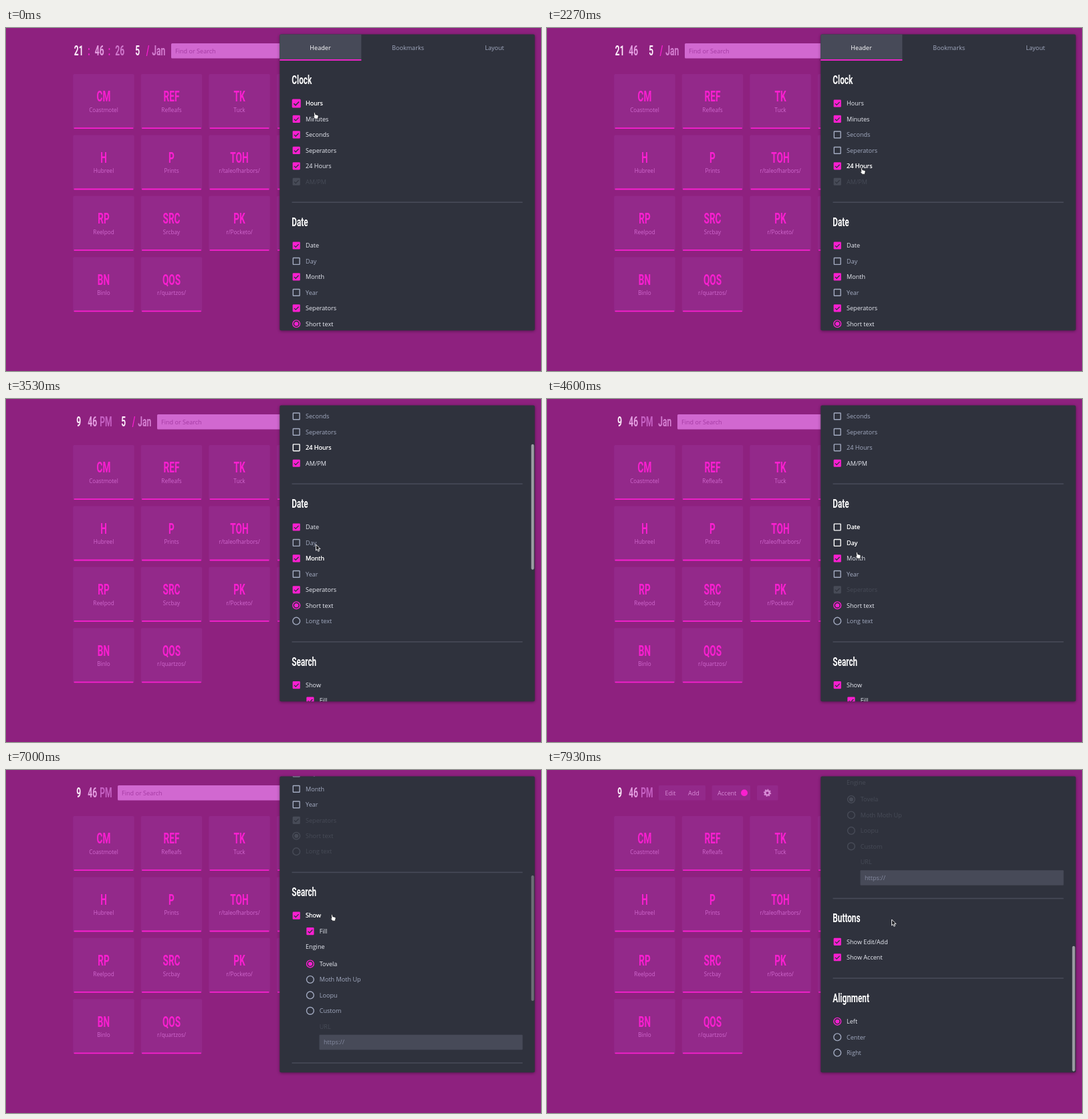
These frames come from a looping animation (800 px wide and 514 px high, 8000 ms). An HTML page:

```html
<!DOCTYPE html>
<html lang="en">
<head>
<meta charset="utf-8">
<title>Start page settings</title>
<style>
  html, body { margin: 0; width: 100%; height: 100%; overflow: hidden; background: #8e217f; }
  svg { display: block; width: 100%; height: 100%; }
  text { font: 9.1px "Open Sans", "Noto Sans", sans-serif; }
  .display { font-family: Roboto, "Liberation Sans", sans-serif; font-weight: 700; }
  .strong { text-shadow: 0 0 .6px #fff; }
  .panel { filter: drop-shadow(0 1px 2px #0006); }
</style>
</head>
<body>
<svg viewBox="0 0 800 514">
  <defs><clipPath id="panelClip"><rect x="409.3" y="9.6" width="381.4" height="443.6" rx="2"/></clipPath></defs>
  <g id="tiles"></g>
  <g id="header"></g>
  <rect class="panel" x="409.3" y="9.6" width="381.4" height="443.6" rx="2" fill="#2f323d"/>
  <g clip-path="url(#panelClip)"><g id="content"></g><g id="scrollbar"></g></g>
  <g id="cursor"></g>
</svg>
<script>
const DURATION = 8000;
const ACCENT = '#f91fd0', PANEL = '#2f323d', SURFACE = '#474a58', DISABLED = '#474b57';
const MUTED = '#a2aac0', LIGHT = '#e9ebf3', TILE = '#93298a';
const ROW = 23.45;
const $ = id => document.getElementById(id);

const bookmarks = [
  ['CM', 'Coastmotel'], ['REF', 'Refleafs'], ['TK', 'Tuck'], ['', ''],
  ['H', 'Hubreel'], ['P', 'Prints'], ['TOH', 'r/taleofharbors/'], ['', ''],
  ['RP', 'Reelpod'], ['SRC', 'Srcbay'], ['PK', 'r/Pocketo/'], ['', ''],
  ['BN', 'Binlo'], ['QOS', 'r/quartzos/'],
];

// Rows: id, label, kind, initially on, nested
const sections = [
  { title: 'Clock', y: 77, rows: [
    ['hours', 'Hours', 'check', 1], ['minutes', 'Minutes', 'check', 1], ['seconds', 'Seconds', 'check', 1],
    ['timeSep', 'Seperators', 'check', 1], ['h24', '24 Hours', 'check', 1], ['ampm', 'AM/PM', 'check', 1]] },
  { title: 'Date', y: 290, rows: [
    ['date', 'Date', 'check', 1], ['day', 'Day', 'check', 0], ['month', 'Month', 'check', 1], ['year', 'Year', 'check', 0],
    ['dateSep', 'Seperators', 'check', 1], ['short', 'Short text', 'radio', 1], ['long', 'Long text', 'radio', 0]] },
  { title: 'Search', y: 526.7, rows: [
    ['show', 'Show', 'check', 1], ['fill', 'Fill', 'check', 1, 1], ['engine', 'Engine', 'label', 1],
    ['engine', 'Tovela', 'radio', 1, 1], ['engine', 'Moth Moth Up', 'radio', 0, 1], ['engine', 'Loopu', 'radio', 0, 1],
    ['engine', 'Custom', 'radio', 0, 1], ['url', 'URL', 'label', 0, 1]] },
  { title: 'Buttons', y: 812.3, rows: [
    ['edit', 'Show Edit/Add', 'check', 1], ['accent', 'Show Accent', 'check', 1]] },
  { title: 'Alignment', y: 931.8, rows: [
    ['left', 'Left', 'radio', 1], ['center', 'Center', 'radio', 0], ['right', 'Right', 'radio', 0]] },
];

// Each click switches its option off
const clicks = { hours: -110, seconds: 620, timeSep: 1420, h24: 2330, date: 4180, month: 5080, show: 7080 };
const PRESS = 100;

const hovers = [[0, 'hours'], [130, 'minutes'], [330, 'seconds'], [1050, 'timeSep'], [1950, 'h24'], [2850, ''],
  [3350, 'month'], [3680, 'day'], [3850, 'date'], [4460, 'day'], [4660, 'month'], [5560, ''], [6800, 'show'], [7480, '']];
const arrowTimes = [[2850, 3680], [5560, 6800], [7480, DURATION]];

const cursorPath = [[0, 459, 126], [450, 461, 161], [930, 461, 161], [1250, 465, 184], [1780, 465, 184],
  [2200, 468, 209], [2800, 468, 209], [3400, 463, 218], [3680, 463, 218], [3950, 460, 193], [4400, 460, 193],
  [4600, 461, 229], [4820, 464, 237], [5530, 464, 237], [5780, 485, 328], [6400, 485, 328], [6900, 485, 216],
  [7470, 485, 216], [7900, 515, 224]];
const scrollPath = [[2800, 0], [3500, 134], [5530, 134], [6161, 344.5], [7470, 344.5], [7900, 591]];
const barFade = [[2780, 0], [2830, 1], [3700, 1], [4300, 0], [5520, 0], [5560, 1], [6900, 1], [7120, 0], [7460, 0], [7500, 1]];

function track(points, t) {
  const next = points.findIndex(p => p[0] > t);
  if (next === 0) return points[0].slice(1);
  if (next < 0) return points[points.length - 1].slice(1);
  const a = points[next - 1], b = points[next];
  const u = (t - a[0]) / (b[0] - a[0]), k = u * u * (3 - 2 * u);
  return a.slice(1).map((v, i) => v + (b[i + 1] - v) * k);
}

const rect = (x, y, w, h, fill, rx = 0) =>
  `<rect x="${x}" y="${y}" width="${w}" height="${h}" rx="${rx}" fill="${fill}"/>`;
const text = (s, x, y, fill, { anchor = 'start', size = 9.1, cls = '' } = {}) =>
  `<text x="${x}" y="${y + size * .36}" fill="${fill}" text-anchor="${anchor}" class="${cls}" style="font-size:${size}px">${s}</text>`;
// Condensed headline face
const display = (s, x, y, fill, size, anchor = 'middle') =>
  `<g transform="translate(${x} ${y}) scale(.62 1)">${text(s, 0, 0, fill, { anchor, size, cls: 'display' })}</g>`;

function drawTiles() {
  return bookmarks.map(([short, name], i) => {
    const x = 146 + i % 4 * 101.5, y = 69 + Math.floor(i / 4) * 91.4;
    return rect(x - 45.7, y, 91.4, 82, TILE, 2) + rect(x - 44.5, y + 80.2, 89, 1.8, ACCENT, .9) +
      display(short, x, y + 33.5, ACCENT, 22) +
      text(name, x, y + 54, '#cf68cd', { anchor: 'middle', size: 8.2 });
  }).join('');
}

function drawHeader(isOn) {
  const parts = [];
  const put = (s, x, fill) => parts.push(display(s, x, 34, fill, 19.5));
  let x = 122;
  const separator = () => {
    if (!isOn('timeSep')) return;
    put(':', x + 2, ACCENT);
    x += 10.5;
  };
  put(isOn('h24') ? '21' : '9', 108.7, '#fdeefb');
  separator();
  put('46', x + 7.2, '#e39de0');
  x += 20;
  if (isOn('seconds')) {
    separator();
    put('26', x + 7.2, '#cf78cc');
    x += 20;
  }
  if (!isOn('h24')) {
    put('PM', x + 7.5, '#c460c2');
    x += 20;
  }
  if (isOn('date')) {
    put('5', x + 13.8, '#fdeefb');
    put('/', x + 29, ACCENT);
    x += 31;
  }
  if (isOn('month')) {
    put('Jan', x + 14.3, '#d47fd1');
    x += 28;
  }
  x += 5;
  if (isOn('show')) {
    parts.push(rect(x, 23, 430 - x, 22.6, '#d168d0', 1.5), text('Find or Search', x + 6, 34.3, '#a43aa2'));
  } else {
    const pink = '#d78bd5';
    parts.push(rect(x, 23, 70, 22.6, TILE, 1.5), rect(x + 79.5, 23, 57.5, 22.6, TILE, 1.5), rect(x + 147, 23, 31.5, 22.6, TILE, 1.5),
      text('Edit', x + 17.5, 34.3, pink, { anchor: 'middle' }), text('Add', x + 52.5, 34.3, pink, { anchor: 'middle' }),
      text('Accent', x + 88, 34.3, pink), `<circle cx="${x + 128}" cy="34.3" r="5" fill="${ACCENT}"/>`,
      `<g fill="none" stroke="${pink}" transform="translate(${x + 162.5} 34.3)"><circle r="3.2" stroke-width="2.6"/>
       <circle r="4.9" stroke-width="1.6" pathLength="16" stroke-dasharray="1 1"/></g>`);
  }
  return parts.join('');
}

function drawIcon(kind, x, y, on, color, scale) {
  const shape = kind === 'radio'
    ? `<circle r="5.4" fill="none" stroke="${color}" stroke-width="1.4"/>` + (on ? `<circle r="3.1" fill="${color}"/>` : '')
    : on
      ? rect(-5.6, -5.6, 11.2, 11.2, color, 1.3) + `<path d="M-3.3 .1l2.3 2.3 4.4-4.5" fill="none" stroke="${PANEL}" stroke-width="1.3"/>`
      : `<rect x="-4.9" y="-4.9" width="9.8" height="9.8" rx=".6" fill="none" stroke="${color}" stroke-width="1.4"/>`;
  return `<g transform="translate(${x} ${y}) scale(${scale})">${shape}</g>`;
}

function drawContent(t, isOn) {
  const hover = hovers.filter(h => h[0] <= t).pop()[1];
  const focus = Object.keys(clicks).filter(id => clicks[id] - PRESS <= t).pop();
  const focused = clicks[focus] <= t ? focus : '';
  const disabled = {
    ampm: isOn('h24'), dateSep: !isOn('date'), short: !isOn('month'), long: !isOn('month'),
    fill: !isOn('show'), engine: !isOn('show'), url: true,
  };

  const drawRow = ([id, label, kind, initial, nested], y) => {
    const on = initial && isOn(id), indent = nested ? 20.7 : 0;
    const active = id === hover || id === focused;
    const color = disabled[id] ? DISABLED : active ? '#fff' : on ? LIGHT : MUTED;
    const iconColor = on && !disabled[id] ? ACCENT : color;
    const age = (t - clicks[id]) / 250;
    const scale = age > 0 && age < 1 ? 1 + .17 * Math.sin(Math.PI * age) : 1;
    return (kind === 'label' ? '' : drawIcon(kind, 434.2 + indent, y, on, iconColor, scale)) +
      text(label, 448 + indent, y, color, { cls: active ? 'strong' : '' });
  };

  const tabs = rect(409, 9, 122.3, 40, SURFACE) + rect(409, 47, 122.3, 1.8, ACCENT) +
    [['Header', 470, '#fff'], ['Bookmarks', 601, MUTED], ['Layout', 730.5, MUTED]]
      .map(([s, x, fill]) => text(s, x, 29.3, fill, { anchor: 'middle' })).join('');

  const body = sections.map(({ title, y, rows }, i) =>
    (i ? rect(427.5, y - 29.6, 345, 1.6, SURFACE) : '') +
    display(title, 427.3, y, '#fff', 19, 'start') +
    rows.map((row, n) => drawRow(row, y + 36 + n * ROW + (title === 'Search' && n > 2 ? 2 : 0))).join('')
  ).join('');

  const field = rect(468.5, 741.2, 304, 22.6, SURFACE, 1) + text('https://', 475, 752.5, '#848aa0');
  return tabs + body + field;
}

function drawCursor(t) {
  const [x, y] = track(cursorPath, t);
  const arrow = arrowTimes.some(([from, to]) => t >= from && t < to);
  const shape = arrow
    ? '<path d="M.5 0v9l2-1.9 1.4 3.2 1.6-.7-1.4-3h2.9z" fill="#16171c" stroke="#fff" stroke-width=".9"/>'
    : '<path d="M1.2 .9q1-1.2 1.8 0l.7 2.8 3.4 .7q1.2.4 1 1.9l-.8 3.9h-3.8l-3.2-3.4q-.2-1.2 1.6-.4z" fill="#fff" stroke="#16171c" stroke-width=".8"/>';
  return `<g transform="translate(${x} ${y})">${shape}</g>`;
}

function render(t) {
  const isOn = id => id === 'hours' || !(t >= clicks[id]);
  const [scroll] = track(scrollPath, t), [opacity] = track(barFade, t);
  $('header').innerHTML = drawHeader(isOn);
  $('content').innerHTML = drawContent(t, isOn);
  $('content').setAttribute('transform', `translate(0 ${-scroll})`);
  $('scrollbar').innerHTML = rect(785.4, 10.4 + scroll * .4286, 4.2, 188, '#9b9da3', 2.1);
  $('scrollbar').setAttribute('opacity', opacity);
  $('cursor').innerHTML = drawCursor(t);
}

$('tiles').innerHTML = drawTiles();
const start = performance.now();
function frame() {
  render((performance.now() - start) % DURATION);
  requestAnimationFrame(frame);
}
frame();
</script>
</body>
</html>
```
